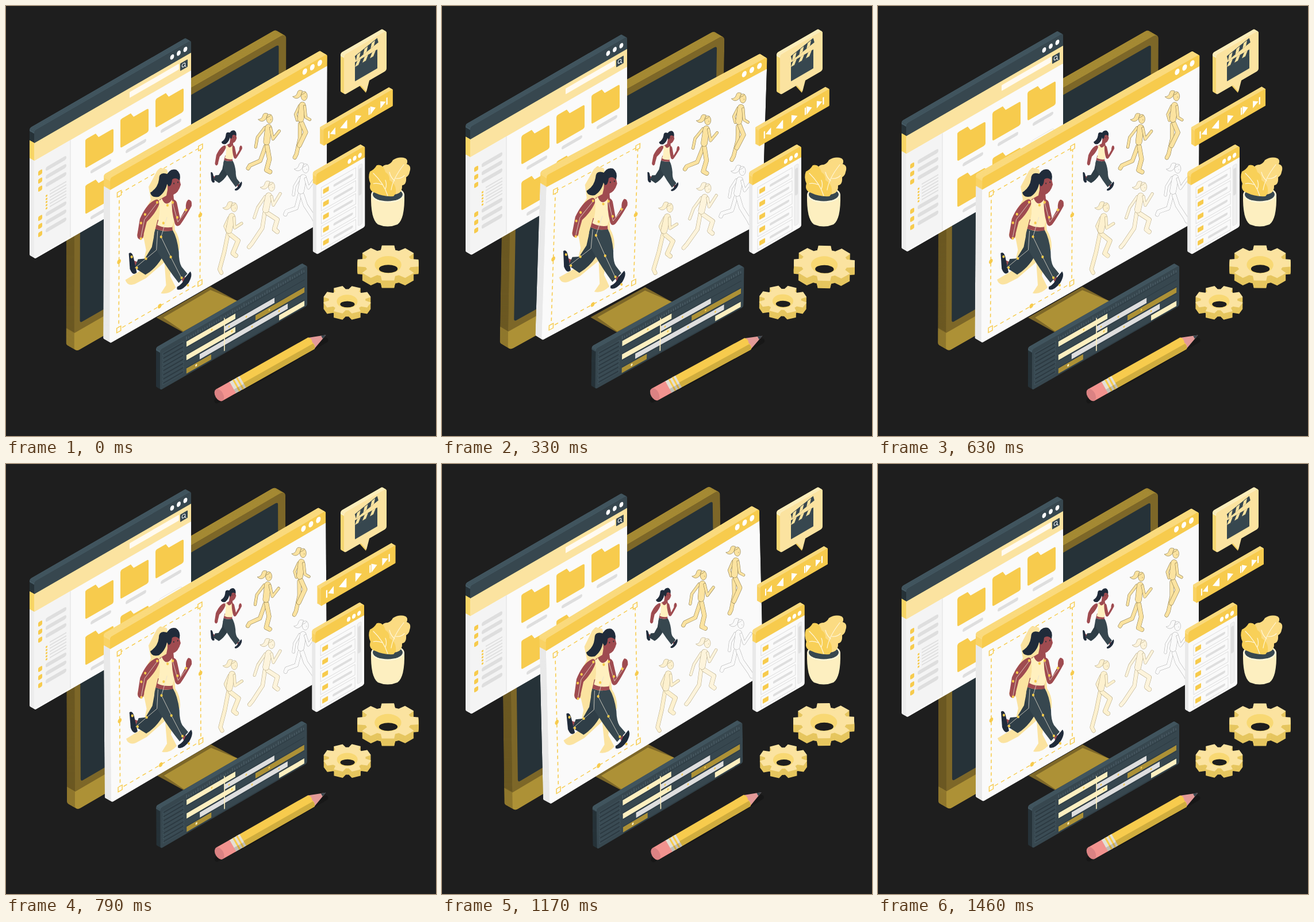
Animation, 748 px wide and 748 px high, one loop 1.5 s. Source, as an HTML page:

```html
<!DOCTYPE html>
<html lang="en">
<head>
<meta charset="utf-8">
<title>Animation studio</title>
<style>
html, body { margin: 0; width: 100%; height: 100%; overflow: hidden; background: #1e1e1e; }
svg { display: block; width: 100vw; height: 100vh; }
</style>
</head>
<body>
<svg id="stage" viewBox="0 0 748 748"></svg>
<script>
const SLOPE = .577;
const YELLOW = '#f7cb4d', CREAM = '#fbe3a0', PALE = '#fdefc0', OLIVE = '#ad9136', BROWN = '#7d6728';
const DARK = '#37474f', NIGHT = '#263238', STEEL = '#455a64', PAPER = '#fafafa', GREY = '#dedede';
const SKIN = '#9f4b50', HAIR = '#202b3a';

const rect = (x, y, w, h, fill, extra = '') => `<rect x="${x}" y="${y}" width="${w}" height="${h}" fill="${fill}" ${extra}/>`;
const path = (d, fill, extra = '') => `<path d="${d}" fill="${fill}" ${extra}/>`;
const line = (d, stroke, width, extra = '') =>
  path(d, 'none', `stroke="${stroke}" stroke-width="${width}" stroke-linecap="round" stroke-linejoin="round" ${extra}`);
const oval = (x, y, rx, ry, fill, extra = '') => `<ellipse cx="${x}" cy="${y}" rx="${rx}" ry="${ry}" fill="${fill}" ${extra}/>`;
const repeat = (n, fn) => Array.from({ length: n }, (_, i) => fn(i)).join('');
const iso = (x, y, content) => `<g transform="matrix(1 ${-SLOPE} 0 1 ${x} ${y})">${content}</g>`;
const part = (id, content) => `<g id="${id}">${content}</g>`;
const dots = (x, y, step, r) => repeat(3, i => oval(x + i * step, y, r, r * 1.25, '#fff'));

// Thick isometric panel; each band is [height, front colour, side colour].
function slab(x, y, w, depth, radius, top, bands, content = '') {
  const id = `clip${x}`;
  const height = bands.reduce((sum, [h]) => sum + h, 0);
  const layer = k => {
    let at = 0;
    const faces = bands.map(([h, front, side]) => {
      const face = rect(0, at, w, h + .3, k ? side : front);
      at += h;
      return face;
    }).join('');
    const edge = k ? rect(0, 0, w, radius + 2, top) : '';
    return iso(x - k, y - k * SLOPE, `<g clip-path="url(#${id})">${faces}${edge}</g>`);
  };
  return `<clipPath id="${id}">${rect(0, 0, w, height, '#fff', `rx="${radius}"`)}</clipPath>` +
    repeat(depth + 1, i => layer(depth - i)) + iso(x, y, content);
}

function monitor() {
  const base = path('M262 542L356 488L403 513L403 517L313 570Z', BROWN) + path('M274 542L356 494L403 513L309 566Z', OLIVE);
  const screen = rect(10, 13, 345, 286, NIGHT, 'rx="4"');
  return base + slab(119, 258.5, 368, 14, 10, OLIVE, [[311, BROWN, '#6b5822'], [34, OLIVE, '#8f772d']], screen);
}

function folder(x, y) {
  return path(`M${x} ${y + 3}q0-3 3-3h15l5 9h23q3 0 3 3v35q0 3-3 3h-43q-3 0-3-3z`, YELLOW) +
    rect(x + 9, y + 59, 36, 6, GREY, 'rx="3"');
}

function fileWindow() {
  const row = y => rect(7, y - 4, 7, 8, YELLOW, 'rx="2"') + rect(20, y - 3.5, 36, 7, GREY, 'rx="3"');
  const content = dots(240, 10.5, 11.5, 3.4) +
    rect(166, 29, 86, 10, '#fffaf0', 'rx="1"') + rect(254, 30, 13, 13, DARK, 'rx="1"') +
    oval(260, 36, 2.8, 3, 'none', 'stroke="#fff"') + line('M262 38l2 3', '#fff', 1) +
    rect(0, 53, 63, 168, '#f4f4f4') + line('M63 53V222', '#e0e0e0', 1) +
    [79, 93, 107, 158, 172, 186].map(row).join('') +
    repeat(6, i => rect(27, 120 + i * 5.4, 29, 2, GREY) + (i ? rect(20, 119 + i * 5.4, 3, 3, YELLOW) : '')) +
    [89, 150, 211].map(x => folder(x, 67)).join('') + folder(89, 147) + folder(150, 147) +
    rect(217, 156, 40, 46, 'none', 'rx="4" stroke="#e6e6e6"');
  return slab(49, 217.5, 273, 8, 4, STEEL,
    [[22, DARK, NIGHT], [31, CREAM, '#f8d565'], [171, PAPER, '#ededed']], content);
}

function athlete() {
  return path('M261 337Q267 336 267 344Q260 362 245 376L240 396Q240 405 234 407Q227 405 229 396L233 371Q245 343 261 337Z', SKIN) +
    line('M233 451L220 446M307 470L312 480', SKIN, 7) +
    path('M214 431Q219 427 222 437L228 464Q221 471 216 458Z', HAIR) +
    path('M298 489Q308 484 311 474L321 462Q326 468 318 482Q306 497 298 493Z', HAIR) +
    path('M259 394L254 420L242 440L230 441L224 456L243 468Q260 458 272 438L282 395Z', '#2f3e47') +
    path('M260 388Q276 395 290 390Q298 403 301 428Q301 446 306 454L316 466L301 482Q282 458 269 436Q252 412 260 388Z', DARK) +
    path('M264 372L289 378L290 391Q274 394 260 388Z', SKIN) +
    path('M267 337L279 330L281 320L291 326L293 347L270 349Z', SKIN) +
    path('M266 340L271 335Q278 352 289 337L293 340Q297 364 289 385Q274 387 263 381Q270 362 266 340Z', '#fff0bf') +
    path('M289 336Q297 337 298 346L303 370L313 352Q312 342 317 337Q324 337 323 348Q310 372 303 381Q297 386 294 379Q287 356 289 336Z', SKIN) +
    path('M282 293Q266 287 266 302Q264 317 251 325Q253 335 266 332Q280 322 281 303Z', HAIR) +
    path('M281 302Q288 291 300 295L304 311Q300 326 290 329L281 325Z', SKIN) +
    path('M278 297Q284 282 296 285Q305 291 302 304Q295 297 289 302Q288 314 283 314Q276 306 278 297Z', HAIR) +
    oval(292, 309, .9, 1.4, NIGHT) + oval(299, 307, .9, 1.4, NIGHT);
}

function rig() {
  const bones = 'M263 343L241 372L235 402M290 343L299 376L316 354M280 368L270 402L287 437L306 474M264 392L262 425L244 440L225 456';
  const joints = [[263, 342], [290, 342], [242, 363], [235, 378], [235, 405], [298, 368], [313, 355], [281, 347], [274, 378],
    [270, 402], [287, 437], [306, 473], [244, 440], [228, 456], [219, 437], [317, 486]];
  return line(bones, '#e5dfd0', .8) + joints.map(([x, y]) => oval(x, y, 2.1, 2.4, YELLOW)).join('');
}

// Outlined drawing of a runner; limbs are given as screen paths.
function sketch(fill, ink, [x, y], torso, rearArm, arm, rearLeg, leg) {
  const limb = (d, w) => line('M' + d, ink, w + 1) + line('M' + d, fill, w);
  return limb(rearArm, 4) + limb(rearLeg, 6) + limb(leg, 7) + limb(torso, 10.5) + limb(arm, 4) +
    path(`M${x - 3} ${y - 9}q-8-3-9 4q-2 6-8 6q6 6 12 1q4-3 4-8z`, fill, `stroke="${ink}" stroke-width=".6"`) +
    oval(x, y, 5.5, 8, fill, `stroke="${ink}" stroke-width=".6"`) +
    line(`M${x - 5} ${y - 2}q6-2 8-5M${x + 2} ${y + 1}v1`, ink, .6);
}

function mainWindow() {
  const handles = [[16, 36.5], [157, 36.5], [16, 272.5], [157, 272.5]]
    .map(([x, y]) => rect(x - 3.5, y - 4, 7, 8, PAPER, `stroke="${YELLOW}" stroke-width="1.5"`)).join('') +
    [[87, 36.5], [87, 272.5], [16, 154.5], [157, 154.5]].map(([x, y]) => oval(x, y, 3.3, 3.8, YELLOW)).join('');
  const content = dots(338, 8.5, 13, 4) +
    rect(16, 36.5, 141, 236, 'none', `stroke="${YELLOW}" stroke-width="1.6" stroke-dasharray="6 5"`) + handles;
  const shade = path('M262 288Q268 279 280 285L290 330L294 390Q304 405 302 424L290 440L286 470L296 490Q284 503 270 500L279 486' +
    'L276 446L244 474L225 484Q212 489 208 477L236 460L244 425L240 405L228 400L236 365L252 338L248 315Z', CREAM);
  const soft = '#b0a27c', ink = '#7f6f42';
  return slab(181, 300, 377, 11, 4, '#fadb80', [[21, YELLOW, '#f9d264'], [267, PAPER, '#e9e9e9']], content) +
    shade + athlete() + rig() + `<g transform="translate(249 74) scale(.5)">${athlete()}</g>` +
    sketch(CREAM, ink, [458, 196], '456 211L453 236', '450 211L437 228L434 245', '460 212L464 231L475 217',
      '451 244L442 269L424 277L421 282', '454 244L458 266L453 285L459 288') +
    sketch(CREAM, ink, [518, 156], '515 172L512 196', '510 173L503 188L506 198', '519 174L521 193L528 197',
      '511 205L511 230L505 257L502 263', '514 203L521 219L510 242') +
    sketch('#fdf1cf', soft, [397, 350], '393 366L388 390', '388 368L381 383L386 394', '397 368L398 386L410 378',
      '386 398L380 428L372 458L375 464', '390 397L404 408L395 430L400 434') +
    sketch('#fdf4dc', soft, [462, 314], '457 330L452 354', '451 331L438 350L432 368', '462 331L465 346L477 326',
      '450 360L446 386L428 413L423 419', '455 360L472 371L467 388L472 392') +
    sketch(PAPER, '#aaa', [521, 282], '517 298L513 321', '511 298L502 313L500 328', '521 300L526 316L538 299',
      '511 328L505 351L488 357L486 362', '515 328L521 346L535 367L538 373');
}

function timeline() {
  const bar = (row, from, to, fill) => rect(from, 12.5 + row * 11.7, to - from, 9, fill);
  const content = repeat(8, i => rect(5, 9 + i * 7.2, 36, 4.5, '#2f3d45', `stroke="${STEEL}" stroke-width=".8"`)) +
    repeat(6, i => line(`M46 ${11.2 + i * 11.7}H251`, '#2c3a42', 1)) +
    repeat(52, i => line(`M${46 + i * 4} ${i % 5 ? 6 : 4}V9`, '#61747e', .6)) +
    bar(0, 46, 131, PALE) + bar(1, 112, 199, GREY) + bar(2, 46, 131, PALE) + bar(2, 166, 251, OLIVE) +
    bar(3, 69, 222, GREY) + bar(4, 46, 89, OLIVE) + bar(4, 207, 251, PALE) +
    [[120, 29], [150, 29], [90, 17], [125, 40], [190, 40], [160, 52], [207, 52]]
      .map(([x, y]) => oval(x, y, 1.4, 1.6, YELLOW)).join('') +
    oval(63, 63.5, 1.6, 2, PALE) + line('M112 10V66', '#fff0bf', 1.6);
  return slab(268, 598, 256, 7, 4, STEEL, [[71, DARK, NIGHT]], content);
}

function player() {
  const mark = (x, d) => `<g transform="translate(${x} 14.5)">${path(d, '#fff')}</g>`;
  const content = mark(14, 'M-6-6h2V6h-2zM6-6V6L-3 0z') + mark(34, 'M5-7V7L-6 0zM5-7h1V7H5z') + mark(58, 'M-4-7V7L6 0z') +
    mark(81, 'M-5-6h2V6h-2zM-2-7V7L7 0z') + mark(102, 'M-6-6V6L3 0zM4-6h2V6H4z');
  return slab(554, 213.5, 117, 6, 1, '#fadb80', [[28.5, YELLOW, '#f9d264']], content);
}

function listPanel() {
  const row = i => `<g transform="translate(0 ${38 + i * 22.5})">` +
    rect(9, -9, 60, 18, PAPER, 'stroke="#dcdcdc" stroke-width=".9"') +
    rect(12, -4, 10, 8, YELLOW, 'rx="1"') + rect(30, -2, 34, 4.5, GREY, 'rx="2"') + '</g>';
  const content = dots(58, 11.5, 9, 3.2) + repeat(5, row) +
    rect(73, 28, 7, 105, '#f0f0f0', 'rx="2" stroke="#ddd" stroke-width=".6"') + rect(74, 34, 5, 47, GREY, 'rx="2"');
  return slab(540, 292, 85, 6, 4, '#fadb80', [[20, YELLOW, '#f9d264'], [121, PAPER, '#e9e9e9']], content);
}

function bubble() {
  const stripes = repeat(3, i => path(`M${4 + i * 13} 0h6l-4 8h-6z`, CREAM));
  const clapper = rect(19, 33, 39, 24, DARK, 'rx="1"') + `<g transform="translate(19 24)">${rect(0, 0, 39, 9.5, DARK)}${stripes}</g>` +
    `<g transform="translate(19 14) rotate(-13)">${rect(0, -1, 40, 9, DARK)}${stripes}</g>`;
  return path('M609 132L626 151L633 122Z', '#f0cd60') +
    slab(588, 85, 74, 6, 4, '#fdf0c5', [[70, CREAM, '#f5d671']], clapper) + path('M614 134L627 149L634 122Z', CREAM);
}

function plant() {
  return path('M635 328Q634 371 647 380Q664 387 681 380Q694 371 693 328Z', PALE) +
    oval(664, 328, 29, 14, '#fff6d8') + oval(664, 328, 26, 11.5, DARK) +
    path('M664 330Q652 305 655 292Q650 276 664 276Q670 274 673 268Q684 261 695 265Q700 268 697 275Q706 277 702 289' +
      'Q701 295 696 298Q697 311 689 312Q690 324 680 327Z', '#fbdb82') +
    path('M674 331Q656 332 642 325Q630 321 634 309Q629 298 633 288Q640 285 645 277Q656 274 660 289Q668 294 667 303Q680 310 678 326Z', '#f8d058') +
    line('M670 320Q673 300 692 276M676 304Q669 298 667 289M678 300Q687 301 693 295M664 330Q657 308 639 291M655 311Q646 307 639 309M660 318Q663 311 660 303', '#fff6d8', 1.2);
}

function gear(x, y, r, depth, turn) {
  const points = [];
  for (let tooth = 0; tooth < 8; tooth++) {
    for (const [offset, scale] of [[-.31, .76], [-.2, 1], [.2, 1], [.31, .76]]) {
      const a = turn + tooth * Math.PI / 4 + offset;
      points.push(`${r * scale * Math.cos(a)},${r * scale * Math.sin(a) * SLOPE}`);
    }
  }
  const wheel = (dy, fill) => `<polygon points="${points.join(' ')}" fill="${fill}" transform="translate(${x} ${y + dy})"/>`;
  return repeat(depth, i => wheel(depth - i, '#e6c65f')) + wheel(0, CREAM) +
    oval(x, y + 3, r * .43, r * .28, '#f8d873') + oval(x + .5, y + r * .19, r * .3, r * .13, '#1e1e1e');
}

function pencil() {
  return line('M367 687L450 644L556 581', '#171717', 9) + '<g transform="translate(371 677) rotate(-29.5)">' +
    path('M184-11L213 0L184 11Z', '#e39a98') + path('M205-3L213 0L205 3Z', DARK) +
    path('M40-11.5H184Q189-7 186 0Q189 6 184 11.5H40Z', YELLOW) + path('M40 2H186Q188 7 184 11.5H40Z', '#d0ad3e') +
    rect(26, -11.5, 21, 23, '#e4e0d4') + rect(33, -11.5, 3, 23, YELLOW) + rect(40, -11.5, 3, 23, YELLOW) +
    rect(26, 4, 21, 7.5, '#000', 'opacity=".15"') +
    rect(0, -11.5, 27, 23, '#f2938f') + oval(0, 0, 7, 11.5, '#db8283') + '</g>';
}

document.getElementById('stage').innerHTML =
  part('monitor', monitor()) + part('files', fileWindow()) + part('main', mainWindow()) + part('timeline', timeline()) +
  bubble() + part('player', player()) + part('list', listPanel()) + plant() +
  part('gears', gear(664.5, 447, 54, 13, 0) + gear(593.5, 511, 42, 11, Math.PI / 8)) + part('pencil', pencil());

const sway = p => p < .25 ? 4 * p : p < .75 ? 2 - 4 * p : 4 * p - 4;

function keyed(keys, p) {
  const i = keys.findIndex(([at]) => at > p);
  const [a, from] = keys[i - 1], [b, to] = keys[i];
  return from + (to - from) * (p - a) / (b - a);
}

const PULSE = [[0, 1], [.1, 1.11], [.36, 1], [.55, 1.115], [.66, 1], [1, 1]];
const SHAKE = [[0, 0], [.1, -1.5], [.2, 2], [.25, 0], [.33, -5], [.45, 4.2], [.51, -5], [.554, -2],
  [.61, 5], [.667, -2], [.71, -5], [.807, 6], [.9, -1.5], [1, 0]];
const move = (id, transform) => document.getElementById(id).setAttribute('transform', transform);

function frame() {
  const p = (performance.now() / 1500 + 1 / 36) % 1;
  const turn = sway(p);
  const rotate = (id, degrees, x, y) => move(id, `rotate(${turn * degrees} ${x} ${y})`);
  rotate('monitor', .95, 296, 320);
  rotate('main', 1.8, 365, 333);
  rotate('timeline', .95, 392, 558);
  rotate('gears', .95, 635, 481);
  rotate('pencil', .95, 460, 629);
  move('files', `translate(0 ${-14.5 * (1 - Math.abs(1 - 2 * p))})`);
  move('player', `translate(609.5 193) scale(${keyed(PULSE, p)}) translate(-609.5 -193)`);
  move('list', `translate(${keyed(SHAKE, p)} 0)`);
  requestAnimationFrame(frame);
}
frame();
</script>
</body>
</html>
```
